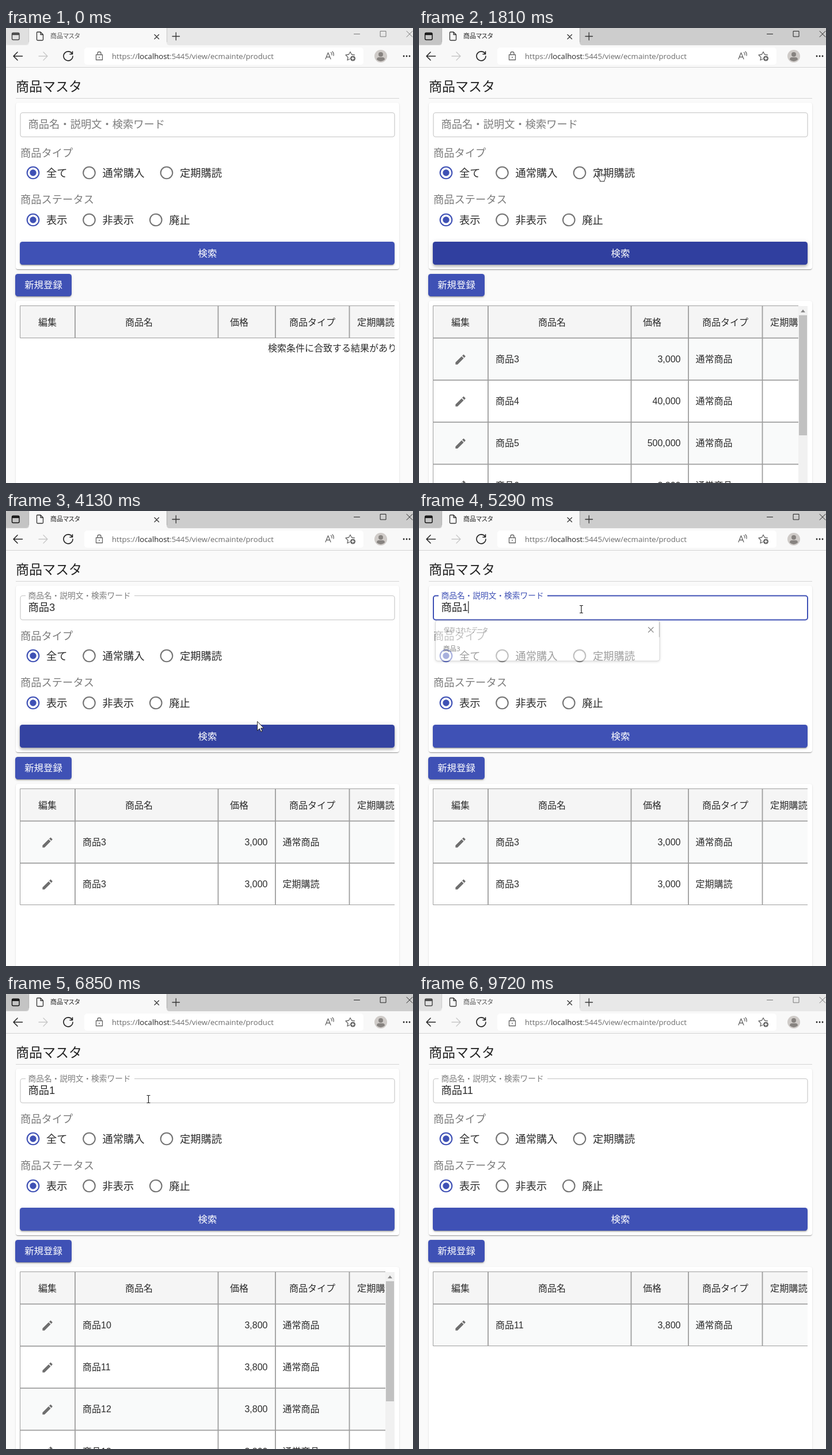
An HTML page for the animation above (9.79 s loop, 707x792 px).

```html
<!DOCTYPE html>
<html lang="ja">
<head>
<meta charset="utf-8">
<title>商品マスタ</title>
<style>
html, body { margin: 0; width: 100%; height: 100%; overflow: hidden; background: #fafafa; }
#stage { position: absolute; left: 0; top: 0; width: 707px; height: 792px; overflow: hidden; background: #fafafa; }
#stage > div, #ripple { position: absolute; box-sizing: border-box; }
.card { left: 17px; width: 666px; background: #fff; border-radius: 4px;
  box-shadow: 0 2px 1px -1px rgba(0,0,0,.2), 0 1px 1px rgba(0,0,0,.14), 0 1px 3px rgba(0,0,0,.12); }
.button { border-radius: 4.5px; overflow: hidden; background: #3f51b5;
  box-shadow: 0 3px 1px -2px rgba(0,0,0,.2), 0 2px 2px rgba(0,0,0,.14), 0 1px 5px rgba(0,0,0,.12); }
#ripple { border-radius: 50%; background: #fff; }
svg { position: absolute; left: 0; top: 0; display: block; }
text { font-family: 'Liberation Sans', 'Noto Sans CJK JP', 'Noto Sans CJK', sans-serif; font-weight: 350; white-space: pre; }
.ui { font-family: 'Open Sans', 'Noto Sans CJK JP', 'Noto Sans CJK', sans-serif; font-weight: 400; font-feature-settings: 'palt'; }
.line { fill: none; stroke-width: 1.3; stroke-linecap: round; stroke-linejoin: round; }
.inner { stroke-width: 1.8; }
.outer { stroke-width: 1; }
</style>
</head>
<body>
<div id="stage">
  <div class="card" style="top:130px;height:290px"></div>
  <div class="card" style="top:475px;height:340px"></div>
  <div class="button" id="search" style="left:24px;top:372px;width:651px;height:40px"><div id="ripple"></div></div>
  <div class="button" style="left:16px;top:428px;width:98px;height:39px"></div>
  <svg id="view" width="707" height="792" viewBox="0 0 707 792"></svg>
</div>
<script>
const LOOP = 9790, BODY = 18.29, INK = '#2b2b2b', GREY = '#7c7c7c';
const $ = id => document.getElementById(id);
const clamp = v => Math.max(0, Math.min(1, v));
const ease = v => v * v * (3 - 2 * v);
const lerp = (a, b, k) => a + (b - a) * k;
const mix = (a, b, k) => `rgb(${a.map((v, i) => Math.round(lerp(v, b[i], k)))})`;

// Text placed by the vertical centre of its glyphs
const text = (x, cy, size, str, fill = INK, extra = '') =>
  `<text x="${x}" y="${cy + size * .38}" font-size="${size}" fill="${fill}" ${extra}>${str}</text>`;
const line = (d, color, extra = '') => `<path class="line" d="${d}" stroke="${color}" ${extra}/>`;
const box = (x, y, w, h, fill, extra = '') =>
  `<rect x="${x}" y="${y}" width="${w}" height="${h}" fill="${fill}" ${extra}/>`;
const middle = 'text-anchor="middle"';

const tabBar = active => {
  const ink = active ? '#222' : '#777';
  return box(0, 0, 707, 30, active ? '#cdcdcd' : '#e8e8e8') +
    box(0, 0, 39, 29, active ? '#c4c4c4' : '#e0e0e0', 'rx="5"') +
    `<path d="M35 30Q40 30 40 25V0H279V25Q279 30 284 30Z" fill="#f8f8f8"/>` +
    line('M39.5 0V24M279.5 0V24', active ? '#b5b5b5' : '#cfcfcf') +
    box(10.5, 8.5, 12.5, 12, 'none', `rx="2" stroke="${active ? '#111' : '#444'}" stroke-width="1.4"`) +
    line('M11 11.5H22.5M11 10H22.5', active ? '#111' : '#444') +
    line('M53.5 8Q53.5 7 54.5 7H60L64.5 11.5V20Q64.5 21.5 63 21.5H55Q53.5 21.5 53.5 20ZM60 7V11.5H64.5', '#333') +
    text(77, 14, 11, '商品マスタ', active ? '#222' : '#555', 'class="ui"') +
    line('M258 11.5L265.5 19M265.5 11.5L258 19', '#333') +
    line('M289 14.5H301.5M295.3 8V21', '#333') +
    line('M604.5 10.5H614.5M650.5 5.5H660V15H650.5ZM696 5.5L706 15.5M706 5.5L696 15.5', ink, 'style="stroke-width:1"');
};

const toolBar = () =>
  box(0, 30, 707, 38, '#f8f8f8') + box(0, 68, 707, 1, '#d2d2d2') +
  box(136, 34, 485, 30, '#fff', 'rx="5"') +
  line('M13 49H28.5M20 42L13 49L20 56', '#222', 'style="stroke-width:1.5"') +
  line('M57 49H72M65 42L72 49L65 56', '#c6c6c6') +
  line('M115 45A8 8 0 1 0 116 49M115.5 41V45.5H111', '#222', 'style="stroke-width:1.6"') +
  line('M156.5 46.5H167.5V55.5H156.5ZM159 46V44Q159 41.5 162 41.5Q165 41.5 165 44V46', '#666') +
  `<circle cx="162" cy="51" r="1" fill="#666"/>` +
  `<text class="ui" x="184" y="53.8" font-size="13.2" fill="#6b6b6b">https://<tspan fill="#222">localhost</tspan>:5445/view/ecmainte/product</text>` +
  line('M555 54L559.5 43L564 54M556.5 50.5H562.5M564.5 42.5Q566.5 44 566 47M567 41Q570 44 569 48', '#666') +
  line('M598 41.5L600.3 46L605.5 46.8M598 41.5L595.5 46L590 47L594 51L593 56L597 54', '#666') +
  `<circle cx="602.5" cy="53" r="4.5" fill="#666"/>` + line('M600.5 53H604.5M602.5 51V55', '#fff') +
  `<circle cx="651" cy="49" r="11" fill="#cfcbc8"/><circle cx="651" cy="46" r="4" fill="#878380"/>` +
  `<path d="M644 55Q644 51 648 51H654Q658 51 658 55Q651 61 644 55Z" fill="#878380"/>` +
  [691, 696, 701].map(x => `<circle cx="${x}" cy="49" r="1.4" fill="#222"/>`).join('');

const radio = (x, y, label, on) =>
  `<circle cx="${x}" cy="${y}" r="10.3" fill="none" stroke="${on ? '#3f51b5' : '#757575'}" stroke-width="2.1"/>` +
  (on ? `<circle cx="${x}" cy="${y}" r="5.7" fill="#3f51b5"/>` : '') + text(x + 23, y, BODY, label);

const form = () =>
  text(17, 101, 23, '商品マスタ', '#222') + box(17, 122, 666, 1, '#d5d5d5') +
  text(25, 217, BODY, '商品タイプ', GREY) +
  radio(47, 252, '全て', true) + radio(144.5, 252, '通常購入') + radio(279, 252, '定期購読') +
  text(25, 298, BODY, '商品ステータス', GREY) +
  radio(47, 334, '表示', true) + radio(144.5, 334, '非表示') + radio(260.3, 334, '廃止') +
  text(350, 392, 16.4, '検索', '#fff', middle + ' style="font-weight:500"') +
  text(65, 447, 16.4, '新規登録', '#fff', middle + ' style="font-weight:500"');

const dropdown = () =>
  box(28.5, 190.5, 389.5, 70.5, '#fff', 'rx="4" stroke="#bbb" style="filter:drop-shadow(0 1px 2px rgba(0,0,0,.25))"') +
  text(43, 207, 10, '保存されたデータ', '#555', 'class="ui"') +
  text(42, 240, 11.5, '商品3', '#222', 'class="ui"') +
  line('M398.5 202.5L407 211M407 202.5L398.5 211', '#333') + line('M417.5 194V219', '#888');

const PENCIL = 'M3 17.25V21h3.75L17.81 9.94l-3.75-3.75L3 17.25zM20.71 7.04c.39-.39.39-1.02 0-1.41l-2.34-2.34c-.39-.39-1.02-.39-1.41 0l-1.83 1.83 3.75 3.75 1.83-1.83z';
const HEADER_TOP = 483.5, BODY_TOP = 540, ROW = 73.2, LEFT = 24.5, COLUMNS = [120, 368.5, 468, 596.5];
const NORMAL = '通常商品', SUBSCRIPTION = '定期購読';
const series = n => [`商品${n}`, '3,800', NORMAL];
const results = {
  none: [],
  all: [['商品3', '3,000', NORMAL], ['商品4', '40,000', NORMAL], ['商品5', '500,000', NORMAL], series(6)],
  three: [['商品3', '3,000', NORMAL], ['商品3', '3,000', SUBSCRIPTION]],
  ones: [10, 11, 12, 13].map(series),
  eleven: [series(11)]
};

function table(rows) {
  const scrolls = rows.length > 3, right = scrolls ? 659 : 675;
  const bottom = Math.round(BODY_TOP + rows.length * ROW) - .5;
  let out = box(LEFT, HEADER_TOP, 651, 56, '#f5f5f5');
  let inner = '';
  rows.forEach(([name, price, type], i) => {
    const top = BODY_TOP + i * ROW, cy = top + 36;
    inner += `M${LEFT} ${top - .3}H680`;
    out += box(LEFT, top, 651, ROW, i % 2 ? '#fff' : '#f9fafa') +
      `<path d="${PENCIL}" fill="#6f6f6f" transform="translate(60.5 ${cy - 10.5}) scale(.96)"/>` +
      text(133, cy, 16, name) + text(454.5, cy, 16, price, INK, 'text-anchor="end"') + text(480.5, cy, 16, type);
  });
  out += text(72, 511.5, 16, '編集', INK, middle) + text(231, 511.5, 16, '商品名', INK, middle) +
    text(405, 511.5, 16, '価格', INK, middle) + text(532, 511.5, 16, '商品タイプ', INK, middle) +
    text(610, 511.5, 16.2, '定期購読');
  inner += COLUMNS.map(x => `M${x} ${HEADER_TOP}V${bottom}`).join('');
  out += `<path class="inner" d="${inner}" stroke="#9e9e9e"/>` +
    `<path class="outer" d="M680 ${HEADER_TOP}H${LEFT}V${bottom}H680" fill="none" stroke="#9e9e9e"/>`;
  if (!rows.length) out += text(455, 557, 16, '検索条件に合致する結果がありません');
  const bar = scrolls ? box(659, 484, 16, 310, '#f1f1f1') + box(660, 500, 14, 209, '#c1c1c1') +
    '<path d="M663 495L667 490L671 495Z" fill="#888"/>' : '';
  return `<clipPath id="edge">${box(24, 483, right - 24, 310, '#000')}</clipPath><g clip-path="url(#edge)">${out}</g>${bar}`;
}

const HAND = 'M-1.5 1Q-1.5-.5 0-.5Q1.5-.5 1.5 1V6.5Q3 5.5 4 7Q5.5 6 6.5 7.5Q8.5 7 8.5 9.5V13Q8.5 15.5 7 17V19H-.5V17Q-3 14-4.5 11Q-5 9-3 9L-1.5 10.5Z';
const pointers = {
  hand: `<path d="${HAND}" fill="#fff" stroke="#222"/><path d="M1.5 7V10M4 7.5V10M6.5 8V10" stroke="#222" fill="none"/>`,
  beam: '<path d="M-3-6.5H-1Q0-6.5 0-5.5Q0-6.5 1-6.5H3M0-5.5V5.5M-3 6.5H-1Q0 6.5 0 5.5Q0 6.5 1 6.5H3" fill="none" stroke="#222" stroke-width="1.2"/>',
  arrow: '<path d="M0 0V16L3.7 12.5L6.2 18L8.5 17L6 11.7H11Z" fill="#fff" stroke="#222"/>'
};

$('view').innerHTML = `<g id="tabs"></g>${toolBar()}${form()}
  <rect id="field" x="25" y="147.5" width="650" height="42" rx="4" fill="none"/>
  <rect id="notch" y="145" height="5" fill="#fff"/>
  <text id="label"></text>${text(38.5, 167.5, BODY, '', INK, 'id="value"')}
  <rect id="caret" y="157" width="1.2" height="21" fill="#222"/>
  <g id="saved">${dropdown()}</g><g id="table"></g>
  <circle id="press" r="12" fill="rgba(255,235,0,.5)"/><g id="pointer"></g>`;
$('label').textContent = '商品名・説明文・検索ワード';

const VALUES = [[0, ''], [2500, '商'], [2640, '商品'], [2780, '商品3'], [4890, '商品'], [5200, '商品1'], [7100, '商品11']];
const TABLES = [[0, 'none'], [1500, 'all'], [3720, 'three'], [6380, 'ones'], [8620, 'eleven']];
const FOCUS = [[2360, 3370], [4330, 6100], [6950, 8130]];
const HOVER = [[700, 1800], [3060, 4150], [5950, 6640], [7600, 8950]];
const SEARCHES = [1000, 3370, 6100, 8130];
const PRESSES = [...SEARCHES, 2360, 4330, 6950];
const PATH = [[300, 330, 735], [900, 340, 392], [1650, 340, 392], [1810, 315, 248], [2230, 285, 171],
  [2850, 285, 171], [3240, 461, 397], [4050, 461, 397], [4400, 282, 171], [5620, 282, 171], [6000, 320, 392],
  [6600, 320, 392], [6850, 247.5, 183], [6950, 247, 172], [7300, 247, 172], [7690, 337, 379],
  [8770, 337, 379], [9320, 365, 800]];

const current = (list, t) => list.filter(e => e[0] <= t).pop()[1];
const within = (spans, t) => spans.some(([a, b]) => t >= a && t < b);
const level = (spans, t, d) => Math.max(...spans.map(([a, b]) =>
  t < a ? 0 : t < b ? clamp((t - a) / d) : Math.min(clamp((b - a) / d), clamp(1 - (t - b) / d))));

function position(t) {
  const i = PATH.findIndex(p => p[0] > t);
  if (i < 1) return null;
  const [t0, x0, y0] = PATH[i - 1], [t1, x1, y1] = PATH[i];
  const k = ease((t - t0) / (t1 - t0));
  return [lerp(x0, x1, k), lerp(y0, y1, k)];
}

function pointerKind(x, y) {
  if (y > 147 && y < 190) return 'beam';
  if (y >= 372 && y < 412 || x < 376 && y > 240 && y < 264) return 'hand';
  return 'arrow';
}

const set = (id, attrs) => { for (const k in attrs) $(id).setAttribute(k, attrs[k]); };
const shown = {};
function fill(id, key, make) {
  if (shown[id] !== key) { shown[id] = key; $(id).innerHTML = make(key); }
}

function drawField(t) {
  const float = ease(clamp((t - 2360) / 200)), focused = within(FOCUS, t);
  const size = lerp(BODY, BODY * .75, float), value = current(VALUES, t);
  set('field', { stroke: focused ? '#3f51b5' : '#c4c4c4', 'stroke-width': focused ? 2 : 1.1 });
  set('notch', { x: lerp(128, 34, float), width: 189 * float });
  set('label', { x: 38.5, y: lerp(167.5, 147, float) + size * .38, 'font-size': size,
    fill: mix([124, 124, 124], [63, 81, 181], level(FOCUS, t, 200)) });
  $('value').textContent = value;
  const width = [...value].reduce((w, c) => w + BODY * (c < '~' ? .556 : 1), 0);
  set('caret', { x: 38.5 + width, opacity: focused ? 1 : 0 });
  set('saved', { opacity: level([[4900, 5200]], t, 200) });
}

function drawButton(t) {
  const hover = ease(level(HOVER, t, 250)), style = $('search').style;
  style.background = mix([63, 81, 181], [48, 63, 159], hover);
  style.boxShadow = `0 ${lerp(3, 2, hover)}px ${lerp(1, 4, hover)}px ${lerp(-2, -1, hover)}px rgba(0,0,0,.2),
    0 ${lerp(2, 4, hover)}px ${lerp(2, 5, hover)}px rgba(0,0,0,.14), 0 1px ${lerp(5, 10, hover)}px rgba(0,0,0,.12)`;
  const start = SEARCHES.filter(s => s <= t).pop(), age = t - start, ripple = $('ripple').style;
  if (!(age < 800)) { ripple.opacity = 0; return; }
  const [x, y] = position(start), grow = ease(clamp(age / 550));
  const r = grow * (Math.max(x - 24, 675 - x) + 1);
  Object.assign(ripple, { left: x - 24 - r + 'px', top: y - 372 - r + 'px', width: 2 * r + 'px', height: 2 * r + 'px',
    opacity: lerp(.1, .3, grow) * (1 - clamp((age - 250) / 550)) });
}

function drawPointer(t) {
  const p = position(t);
  set('pointer', { opacity: p ? 1 : 0 });
  set('press', { opacity: p && PRESSES.some(s => t >= s && t < s + 130) ? 1 : 0 });
  if (!p) return;
  fill('pointer', pointerKind(...p), kind => pointers[kind]);
  set('pointer', { transform: `translate(${p[0]} ${p[1]})` });
  set('press', { cx: p[0], cy: p[1] });
}

function render(t) {
  fill('tabs', t >= 260 && t < 9720, tabBar);
  fill('table', current(TABLES, t), key => table(results[key]));
  drawField(t);
  drawButton(t);
  drawPointer(t);
}

const origin = performance.now();
function tick() {
  render((performance.now() - origin) % LOOP);
  requestAnimationFrame(tick);
}
tick();
</script>
</body>
</html>
```
